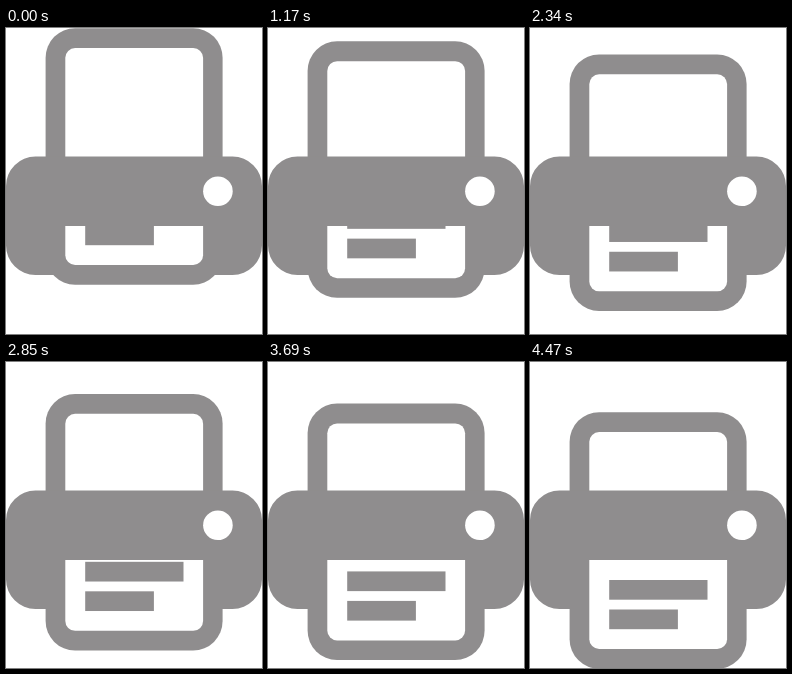
Recreate the animation shown at these times as an HTML page. Size 256x306 px, loop 4500 ms.

```html
<!DOCTYPE html>
<html lang="en">
<head>
<meta charset="utf-8">
<title>Printer</title>
<style>
  html, body { margin: 0; width: 100%; height: 100%; overflow: hidden; background: #fff; }
  svg { display: block; width: 256px; height: 306px; fill: #8f8d8e; }
  .white { fill: #fff; }
</style>
</head>
<body>
<svg viewBox="0 0 256 306">
  <g id="paper">
    <rect x="39.6" y="0.2" width="177" height="256.5" rx="29.5"/>
    <rect class="white" x="59.3" y="20" width="137.8" height="217" rx="9.85"/>
    <rect x="79.2" y="168" width="98.3" height="19.7"/>
    <rect x="79.2" y="197.5" width="68.7" height="19.7"/>
  </g>
  <path d="M29.5 128.6H226.5A29.5 29.5 0 0 1 256 158.1V217.4A29.5 29.5 0 0 1 226.5 246.9H206V198.1H50V246.9H29.5A29.5 29.5 0 0 1 0 217.4V158.1A29.5 29.5 0 0 1 29.5 128.6Z"/>
  <circle class="white" cx="211.9" cy="163.3" r="14.8"/>
</svg>
<script>
  const LOOP = 4500, TICK = 30, STEP = 45.3, LAST = 99, TRAVEL = 50;
  const paper = document.getElementById('paper');
  const start = performance.now();

  // Steps of 45.3 ms, each shown from the 30 ms tick it falls in.
  function offset(t) {
    const tickEnd = (Math.floor(t / TICK) + 1) * TICK;
    return (Math.ceil(tickEnd / STEP) - 1) * TRAVEL / LAST;
  }

  function draw(now) {
    const t = Math.max(0, now - start) % LOOP;
    paper.setAttribute('transform', `translate(0 ${offset(t).toFixed(3)})`);
    requestAnimationFrame(draw);
  }
  draw(start);
</script>
</body>
</html>
```
